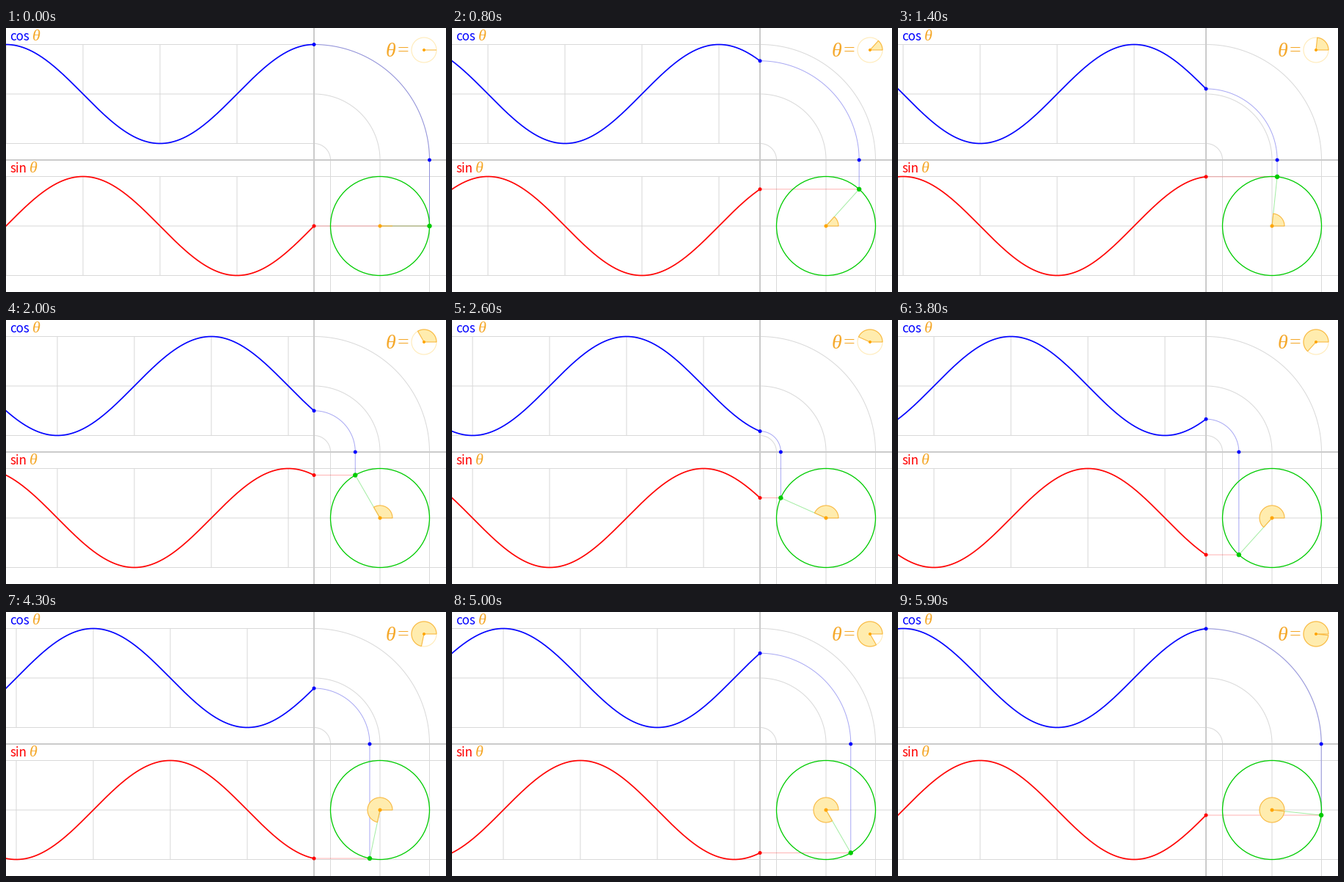
Recreate the animation shown at these times as a matplotlib script. Size 600x360 px, loop 6000 ms.

```python
import numpy as np
import matplotlib.pyplot as plt
from matplotlib.animation import FuncAnimation
from matplotlib.patches import Circle, Polygon

W, H = 600, 360
FRAMES, INTERVAL = 60, 100
X0, Y0 = 420, 180            # crossing of the two main axes
CX, CY, R = 510, 270, 67.5   # unit circle
COS_Y = 90                   # zero level of the cosine graph
PERIOD = 420                 # pixels per full turn
QUARTER = PERIOD / 4
ICON = (570, 30)
WEDGE_R = 17

GRID, AXIS = "#d9d9d9", "#cbcbcb"
BLUE, RED, GREEN = "#0000ff", "#ff0000", "#00cc00"
ORANGE, EDGE, FILL, PALE = "#ffa500", "#f9b93f", "#ffecae", "#ffebb8"
THETA = "#f5a82a"

plt.rcParams["path.snap"] = False
plt.rcParams["toolbar"] = "None"

# At 72 dpi one point is one pixel.
fig = plt.figure(figsize=(W / 72, H / 72), dpi=72, facecolor="white")
ax = fig.add_axes([0, 0, 1, 1])
ax.set_xlim(0, W)
ax.set_ylim(H, 0)
ax.axis("off")


def line(xs=(), ys=(), color=GRID, width=1.0, z=1, alpha=1.0):
    return ax.plot(xs, ys, color=color, lw=width, zorder=z, alpha=alpha,
                   solid_capstyle="butt")[0]


def dot(color, radius, center=(0, 0), z=8):
    return ax.add_patch(Circle(center, radius, color=color, lw=0, zorder=z))


def label(x, y, text, color, size, font, style="normal"):
    ax.text(x, y, text, color=color, fontsize=size, family=font, style=style,
            va="baseline", zorder=9)


def wedge():
    return ax.add_patch(Polygon([(0, 0)], closed=True, facecolor=FILL,
                                edgecolor=EDGE, lw=1.1, zorder=5))


def wedge_points(center, angle):
    a = np.linspace(0, angle, 80)
    x = center[0] + WEDGE_R * np.cos(a)
    y = center[1] - WEDGE_R * np.sin(a)
    return np.vstack([center, np.column_stack([x, y])])


quarter = np.linspace(0, np.pi / 2, 90)


def arc(radius):
    return X0 + radius * np.cos(quarter), Y0 - radius * np.sin(quarter)


# Fixed grid
for offset in (-R, 0, R):
    line([0, X0], [COS_Y + offset] * 2)
    line([0, W], [CY + offset] * 2)
    line([CX + offset] * 2, [Y0, H])
    line(*arc(CX + offset - X0))
line([0, W], [Y0, Y0], AXIS, 2, z=2)
line([X0, X0], [0, H], AXIS, 2, z=2)

# Scrolling vertical grid lines, one pair per quarter turn
columns = [(line(), line()) for _ in range(5)]

# Links between the circle and the graphs
red_link = line(color=RED, z=3, alpha=0.3)
blue_link = line(color="#1010e0", z=3, alpha=0.36)
green_link = line(color=GREEN, z=4, alpha=0.36)

# Angle markers
wedges = [((CX, CY), wedge()), (ICON, wedge())]
ax.add_patch(Circle(ICON, WEDGE_R, fill=False, ec=PALE, lw=1.1, zorder=4))
dot(ORANGE, 2.5, (CX, CY))
dot(ORANGE, 2, ICON)

# Circle, graphs and their moving dots
ax.add_patch(Circle((CX, CY), R, fill=False, ec=GREEN, lw=1.3, zorder=6))
wave_x = np.linspace(-2, X0, 423)
cos_wave = line(color=BLUE, width=1.7, z=7)
sin_wave = line(color=RED, width=1.7, z=7)
cos_end, cos_foot = dot(BLUE, 2.5), dot(BLUE, 2.5)
sin_end, tip = dot(RED, 2.5), dot(GREEN, 3.2)

# Labels
for word, color, base, x in (("cos", BLUE, 17, 36), ("sin", RED, 197, 32)):
    label(5.3, base, word, color, 17, "Noto Sans CJK JP")
    label(x, base, "θ", THETA, 22, "Liberation Serif", "italic")
label(517.5, 39, "θ", THETA, 28, "Liberation Serif", "italic")
label(534, 39, "=", THETA, 28, "Liberation Serif")


def update(i):
    angle = 2 * np.pi * i / FRAMES
    x, y = CX + R * np.cos(angle), CY - R * np.sin(angle)
    radius = x - X0

    shift = (PERIOD * i / FRAMES) % QUARTER
    for k, (upper, lower) in enumerate(columns):
        col = X0 - shift - QUARTER * k
        upper.set_data([col, col], [COS_Y - R, COS_Y + R])
        lower.set_data([col, col], [CY - R, CY + R])

    phase = angle - 2 * np.pi * (X0 - wave_x) / PERIOD
    cos_wave.set_data(wave_x, COS_Y - R * np.cos(phase))
    sin_wave.set_data(wave_x, CY - R * np.sin(phase))

    arc_x, arc_y = arc(radius)
    blue_link.set_data(np.append(x, arc_x), np.append(y, arc_y))
    red_link.set_data([X0, x], [y, y])
    green_link.set_data([CX, x], [CY, y])

    for center, patch in wedges:
        patch.set_xy(wedge_points(center, angle))

    cos_end.center = (X0, Y0 - radius)
    cos_foot.center = (x, Y0)
    sin_end.center = (X0, y)
    tip.center = (x, y)
    return []


anim = FuncAnimation(fig, update, frames=FRAMES, interval=INTERVAL,
                     init_func=lambda: update(0), repeat=True, repeat_delay=0)
plt.show()
```
